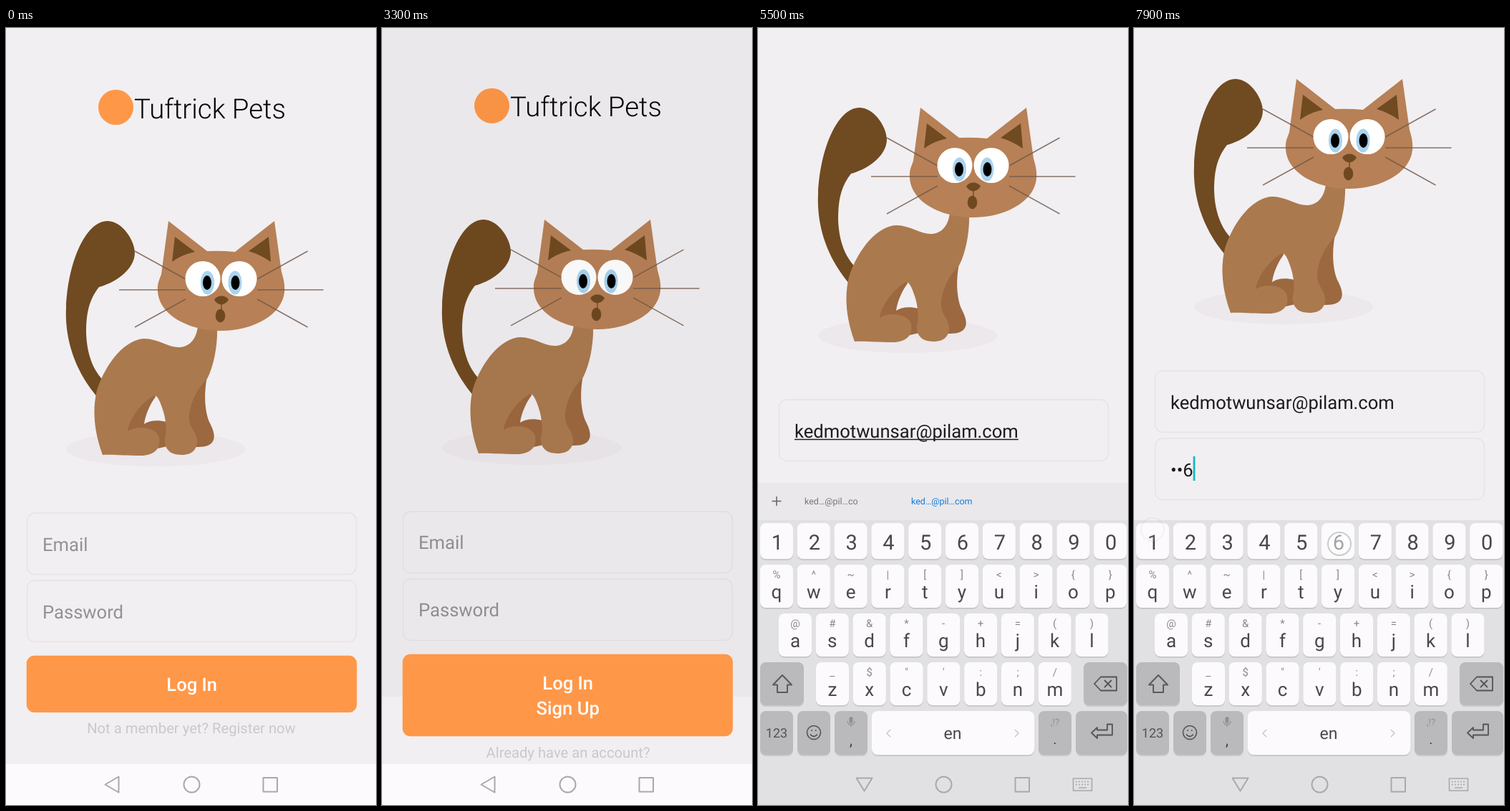
Write an HTML page that moves like this. It is 517 by 1083 pixels and loops after 8000 ms.

```html
<!DOCTYPE html>
<html lang="en">
<head>
<meta charset="utf-8">
<title>Pet app sign-in</title>
<style>
html, body { margin: 0; width: 100%; height: 100%; overflow: hidden; background: #f1eff2; }
svg { display: block; width: 100%; height: 100%; font-family: Roboto, sans-serif; text-rendering: geometricPrecision; }
</style>
</head>
<body>
<svg id="stage" viewBox="0 0 517 1083"></svg>
<script>
const LOOP = 8000, STEP = 100, W = 517, H = 1083;
const BG = '#f1eff2', ORANGE = '#ff9748', INK = '#1c1b1e', HINT = '#939194', FAINT = '#cac8cb';
const EMAIL = 'kedmotwunsar@pilam.com';

const esc = s => s.replace(/&/g, '&amp;').replace(/</g, '&lt;');
const text = (x, y, size, fill, s, anchor = 'start', weight = 400, extra = '') =>
  `<text x="${x}" y="${y}" font-size="${size}" fill="${fill}" text-anchor="${anchor}" font-weight="${weight}" ${extra}>${esc(s)}</text>`;
const mid = (x, y, size, fill, s, weight) => text(x, y, size, fill, s, 'middle', weight);
const rect = (x, y, w, h, fill, r = 0, extra = '') =>
  `<rect x="${x}" y="${y}" width="${w}" height="${h}" rx="${r}" fill="${fill}" ${extra}/>`;
const path = (d, fill, extra = '') => `<path d="${d}" fill="${fill}" ${extra}/>`;
const line = (d, color, w, extra = '') =>
  `<path d="${d}" fill="none" stroke="${color}" stroke-width="${w}" stroke-linejoin="round" ${extra}/>`;
const oval = (x, y, rx, ry, fill, extra = '') =>
  `<ellipse cx="${x}" cy="${y}" rx="${rx}" ry="${ry}" fill="${fill}" ${extra}/>`;

const field = (y, h) => rect(29.5, y, 460, h, 'none', 11, 'stroke="#e6e4e7" stroke-width="1.6"');
const button = (y, label) => rect(28.7, y - .3, 461.5, 79.3, ORANGE, 11) + mid(259.7, y + 49, 25.6, '#fff', label, 500);
const header = () => oval(153.5, 110.5, 24.5, 24.5, ORANGE) + text(179, 125.5, 38.4, '#050505', 'Tuftrick Pets', 'start', 300);

function cat() {
  const body = '#ab794e', dark = '#9c683f', tail = '#704a20';
  const whiskers = [[180, 311, 251, 350], [158, 365, 251, 365], [180, 417, 251, 378]]
    .map(([a, b, c, d]) => `M${a},${b}L${c},${d}M${601.5 - a},${b}L${602 - c},${d}`).join('');
  const eye = (x, px) => oval(x, 349.5, 24.5, 24.5, '#fff') +
    oval(px + (px < 300 ? .5 : -.5), 355, 9.5, 16.5, '#a9d3ee') + oval(px, 355, 6, 10, '#000');
  return oval(209, 587, 125, 24, '#ece8eb') +
    path('M129,516C93,475 82,428 84,390C86,330 110,269 142,269C165,270 180,299 180,313C180,338 150,356 130,361C115,380 112,400 112,425C113,458 124,480 137,492Z', tail) +
    path('M281,486C276,512 278,534 284,549C290,560 292,568 290,574C286,584 275,584 262,584L240,545L262,486Z', dark) +
    path('M208,511C188,516 166,545 170,564L212,586L230,582L224,549C212,546 200,547 193,552C195,538 201,525 209,514Z', dark) +
    path('M135,595C122,560 121,530 127,505C140,465 168,433 194,433C212,433 228,446 243,445C258,444 266,432 268,416L295,416C296,440 291,470 281,489C267,503 255,525 256,547C258,560 269,566 267,580C264,592 255,595 245,595C230,595 221,588 222,572C225,560 223,545 220,535C216,522 212,512 207,512C189,522 172,545 170,562C185,553 210,556 214,571C217,588 205,596 188,596C165,596 150,594 135,595Z', body) +
    path('M227,269L281,311Q300,310 320,312L375,269L385,340C388,350 390,358 389,368C386,400 345,422 301,422C255,422 214,400 212,367C211,355 215,350 217,343Z', '#b78056') +
    path('M236,291L264,312Q245,316 232,326ZM367,291L339,311Q356,316 370,326Z', tail) +
    line(whiskers, '#6f5547', 1.5, 'opacity=".8"') + eye(275, 281) + eye(326, 320.5) +
    path('M291,379Q294,373.5 301,373.5Q308,373.5 311,379Q306,385.5 301,385.5Q295,385 291,379Z', '#6f4820') +
    line('M301,384V393', '#6f4820', 1.3) + oval(299.5, 401, 6.8, 9.2, '#6f4820');
}

function dog() {
  const K = '#050505', shade = '#d6d4d7', outline = `stroke="${K}" stroke-width="3.5" stroke-linejoin="round"`;
  const jaw = 'M265,421C258,432 240,455 222,446C210,454 195,452 190,445C178,449 167,441 172,434C165,427 175,420 171,414Q182,409 192,397';
  const cheek = 'M265,421C276,438 292,452 305,445C315,452 330,452 338,446C350,452 361,447 362,440C374,438 375,430 370,425C379,418 374,412 367,409Q352,404 341,391';
  const brow = 'M192,397Q205,388 218,392Q228,389 239,394M297,391Q310,387 319,391Q330,389 341,391';
  const eye = (x, y) => oval(x, y, 17.5, 17.5, K) + oval(x + 6, y - 8, 3.5, 3.5, '#fff');
  return path('M207,290C170,299 126,350 119,385C116,405 119,413 132,409C140,417 160,414 184,420L190,330Z', '#fff') +
    path('M130,408Q154,400 170,404L176,418Q145,416 130,408Z', shade) +
    line('M179,301C150,318 124,358 119,385C116,405 119,413 132,409C140,417 156,412 174,418', K, 3.5) +
    path('M318,287C355,285 395,340 409,380C414,405 408,412 396,410C388,417 368,412 350,408Z', '#fff', outline) +
    path('M343,312C370,335 370,380 362,403L350,405Z', shade) +
    path('M178,415C158,345 178,278 265,278C345,279 360,345 351,402L350,425Z', '#fff') +
    line('M174,410C160,340 185,278 265,278C345,279 358,345 351,399', K, 5) +
    line('M184,294Q189,289 196,291M198,281L202,288M201,282L209,290M312,289L321,278L326,284L336,279L331,287L341,284', K, 2.5) +
    path('M135,454C118,447 122,431 136,428C146,415 168,417 176,423L190,454Z', '#fff', outline) +
    path('M357,454L368,425C380,416 398,417 404,426C423,429 430,446 414,454Z', '#fff', outline) +
    path('M134,452Q153,441 176,444L182,452ZM378,452Q398,440 419,443Q422,452 410,452Z', shade) +
    path('M265,422Q252,436 252,446Q253,454 265,454Q281,455 283,444Q279,430 265,422Z', '#f6a096', outline) +
    line('M265,428V446', K, 2) + eye(214.5, 381) + eye(315.5, 378) +
    path(jaw + cheek + brow + 'M192,397L239,393L297,390L341,391L265,421Z', '#fff') +
    path('M173,431Q195,440 226,439Q240,436 246,437Q232,450 222,445Q208,452 190,444Q172,447 173,431ZM318,447Q345,442 368,428Q373,437 361,439Q354,449 338,445Z', shade) +
    line(jaw + cheek + brow, K, 3.5) +
    path('M249,388Q251,380 264,380Q277,381 278,389Q277,396 270,403Q265,409 259,403Q250,396 249,388Z', K) +
    line('M280,454H468', '#5d5b5e', 1);
}

// the dimming layer lies below the button, which keeps its full colour
const login = () => rect(0, -40, W, H + 80, BG) + header() + cat() + field(676, 85.5) + field(770, 85.5) +
  text(51, 728.5, 25.6, HINT, 'Email', 'start', 400, 'id="mail"') + text(51, 822.5, 25.6, HINT, 'Password', 'start', 400, 'id="pass"') +
  line('', INK, 1.6, 'id="under"') + rect(0, 0, 2.8, 34, '#16b9c2', 0, 'id="caret"') +
  mid(259, 983, 20.2, FAINT, 'Not a member yet? Register now') +
  rect(0, -40, W, H + 80, '#000', 0, 'id="dim"') + button(875, 'Log In');

const signup = () => rect(0, 0, W, H, BG) + header() + dog() +
  ['Full name', 'Email', 'Password', 'Phone number'].map((s, i) =>
    field(456 + 86.4 * i, 78) + text(51, 504.5 + 86.5 * i, 25.6, HINT, s)).join('') +
  rect(43.5, 816, 28, 28, '#fcfafd', 4, 'stroke="#828084" stroke-width="1.6"') +
  text(101, 838, 20, '#050505', 'Are you a Vet ?') +
  button(870, 'Sign Up') + mid(260, 978.5, 20.2, FAINT, 'Already have an account?');

// strip: 0 none, 1 saved address, 2 suggestions
function keyboard(upper, strip) {
  const ink = '#48474a', soft = '#89878b', pitch = 51.8;
  const key = (x, y, w, h, special) => rect(x, y + 2, w, h, '#c9c8cb', 8) + rect(x, y, w, h, special ? '#bab9bb' : '#fcfafd', 8);
  const row = (x0, y, letters, hints) => [...letters].map((c, i) => {
    const x = x0 + i * pitch;
    return key(x, y, 46, 60) + mid(x + 23, y + 19, 15, soft, hints[i]) +
      mid(x + 23, y + 46.5, 26, ink, upper ? c.toUpperCase() : c);
  }).join('');
  let s = rect(0, 686, W, 520, '#e1e0e2');
  if (strip) s += rect(0, 634, W, 52, '#eae8eb') + line('M19.5,659.5h13M26,653v13', '#636165', 1.5);
  if (strip === 1) s += mid(261, 667, 17.5, '#147bd8', EMAIL) + line('M483,652l16,16m0,-16l-16,16', '#636165', 1.7);
  if (strip === 2) s += text(65, 664, 12.5, '#777', 'ked…@pil…co') + text(214, 664, 12.5, '#147bd8', 'ked…@pil…com');
  s += [...'1234567890'].map((c, i) => key(3 + i * pitch, 690, 46, 50) + mid(27 + i * pitch, 727, 29, ink, c)).join('');
  s += row(3, 748, 'qwertyuiop', '%^~|[]<>{}') + row(29, 816, 'asdfghjkl', '@#&*-+=()') + row(81, 884, 'zxcvbnm', '_$"\':;/');
  s += key(3, 884, 61, 60, 1) + key(455, 884, 61, 60, 1);
  s += path('M34,902l13,13.5h-6v10.5h-14v-10.5h-6z', upper ? '#4c4b4e' : 'none', 'stroke="#5c5a5e" stroke-width="2" stroke-linejoin="round"');
  s += line('M470,914l9,-9.5h22v19h-22zM484,909l10,10m0,-10l-10,10', '#555357', 1.8);
  s += [[3, 46], [55, 46], [107, 46], [392, 46], [444, 72]].map(([x, w]) => key(x, 952, w, 61, 1)).join('') + key(159, 952, 227, 61);
  s += mid(26, 989, 18, '#555357', '123') + oval(78, 982, 9.5, 9.5, 'none', 'stroke="#555357" stroke-width="1.6"') +
    line('M73,984.5q5,6 10,0M74.5,979h1.5M80,979h1.5', '#555357', 1.8);
  s += rect(127.5, 960, 5, 9, '#908e92', 2.5) + line('M125,966q0,5 5,5t5,-5M130,971v3', '#908e92', 1.2) + mid(130, 1000, 22, ink, ',');
  s += mid(272, 991, 23, ink, 'en') + line('M185,978l-5,5 5,5M359,978l5,5-5,5', '#c5c3c7', 1.4);
  s += mid(415, 972, 13, '#908e92', ',!?') + mid(415, 998, 20, ink, '.');
  return s + line('M474,975l-8,7.5 8,7.5v-4.5h21v-15h-7v8h-14z', '#555357', 1.8);
}

const $ = id => document.getElementById(id);
$('stage').innerHTML = `
  <defs><clipPath id="reveal">${rect(0, 0, W, H, '#000', 0, 'id="window"')}</clipPath></defs>
  <g id="login">${login()}</g>
  ${rect(0, 0, W, 500, BG, 0, 'id="cover"')}
  <g id="over" clip-path="url(#reveal)"><g id="signup">${signup()}</g></g>
  ${rect(0, 1026, W, 57, '#fcfafd')}
  <g id="keys"></g><g id="taps"></g>
  ${rect(92, 1026, 114, 57, '#000', 28, 'id="ripple" opacity=".1"')}
  <g fill="none" stroke="#aaa8ab" stroke-width="2" stroke-linejoin="round">
    <path id="back"/><circle cx="259.5" cy="1054.5" r="11"/><rect x="359.5" y="1045" width="19.5" height="19.5"/>
    <g id="board" stroke-width="1.6"><path d="M440.5,1046h26v17h-26zM448,1059h11"/>
      <path stroke-dasharray="2 2" d="M444,1050.5h19M444,1054.5h19"/></g>
  </g>`;

const clamp = v => Math.max(0, Math.min(1, v));
const ramp = (t, from, len) => clamp((t - from) / len);
// cubic-bezier(.4, 0, .2, 1)
function ease(x) {
  let lo = 0, hi = 1;
  for (let i = 0; i < 24; i++) {
    const u = (lo + hi) / 2, v = 1 - u;
    if (1.2 * v * v * u + .6 * v * u * u + u * u * u < x) lo = u; else hi = u;
  }
  return 3 * lo * lo - 2 * lo ** 3;
}
const attr = (id, o) => { for (const k in o) $(id).setAttribute(k, o[k]); };
const show = (id, on) => attr(id, { visibility: on ? 'visible' : 'hidden' });
const label = (id, s, fill) => { $(id).textContent = s; attr(id, { fill }); };

const presses = [[7600, '5', 235, 717], [7700, '1', 26, 699], [7900, '6', 287, 719]];
let keyState = '';

function draw(t) {
  // screen change
  const open = ramp(t, 1745, 425), close = ramp(t, 3053, 425);
  const up = ease(open) - ease(close), shift = .041 * H * (1 - up);
  show('over', up > 0);
  attr('signup', { transform: `translate(0 ${shift})` });
  attr('window', { y: .959 * H * (1 - up) + shift });
  attr('dim', { opacity: .07 * (open - close) });

  // keyboard and panned form
  const second = t >= 6700, filled = t >= 5200;
  const pan = t < 6000 ? 158 * ease(ramp(t, 4270, 130)) : t >= 6900 ? 198 : 0;
  attr('login', { transform: `translate(0 ${-pan - .0135 * H * up})` });
  attr('cover', { y: second ? 664 : 609 });
  show('cover', pan > 100);
  const rise = from => 1 - (1 - ramp(t, from, 250)) ** 2;
  const k = t < 6500 ? rise(4440) - ramp(t, 5900, 250) : rise(6850);
  const state = [!filled, second ? 0 : filled ? 2 : 1];
  if (state.join() !== keyState) {
    keyState = state.join();
    $('keys').innerHTML = keyboard(...state);
  }
  attr('keys', { opacity: k, transform: `translate(0 ${104 * (1 - k)})` });
  show('keys', k > 0);

  // form contents
  const typed = presses.filter(p => t >= p[0]);
  label('mail', filled ? EMAIL : 'Email', filled ? INK : HINT);
  label('pass', typed.length ? '•'.repeat(typed.length - 1) + typed[typed.length - 1][1] : 'Password', typed.length ? INK : HINT);
  const used = second ? typed.length : filled;
  const end = 51 + (used ? $(second ? 'pass' : 'mail').getComputedTextLength() : 0);
  attr('under', { d: `M51,731.5H${end}` });
  show('under', filled && !second);
  attr('caret', { x: end, y: second ? 795 : 701 });
  show('caret', t >= 4300 && (typed.length || Math.floor(t / 500) % 2 === 0));

  $('taps').innerHTML = typed.map(([at, , x, y]) =>
    oval(x, y, 16, 16, '#fff', `fill-opacity=".5" stroke="#aaa" stroke-opacity=".6" stroke-width="2" opacity="${clamp(1 - (t - at) / 250)}"`)).join('');

  const down = k > .5;
  attr('back', { d: down ? 'M137.5,1045.5h22l-11,18z' : 'M157.5,1043.5v22l-19,-11z' });
  show('board', down);
  show('ripple', t >= 5900 && t < 6300);
}

const start = performance.now();
function tick() {
  const t = (performance.now() - start) % LOOP;
  draw(Math.floor(t / STEP) * STEP);
  requestAnimationFrame(tick);
}
tick();
</script>
</body>
</html>
```
